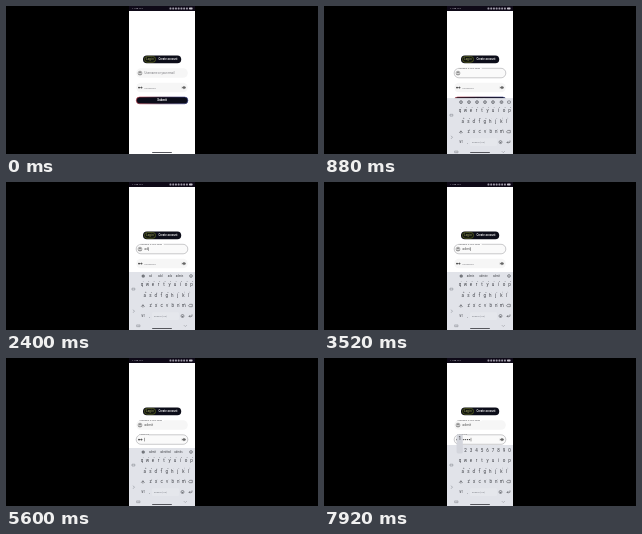
Animation, 312 px wide and 148 px high, one loop 8000 ms. Source, as an HTML page:

```html
<!DOCTYPE html>
<html lang="en">
<head>
<meta charset="utf-8">
<title>Sign-in form</title>
<style>
html, body { margin: 0; width: 100%; height: 100%; overflow: hidden; background: #000; }
svg { display: block; width: 100%; height: 100%; }
text { font-family: Roboto, Arial, sans-serif; }
</style>
</head>
<body>
<svg id="stage" viewBox="0 0 312 148">
  <defs>
    <clipPath id="screen"><rect x="122.9" width="66.2" height="148"/></clipPath>
    <linearGradient id="rim">
      <stop stop-color="#d13c4b"/><stop offset=".45" stop-color="#4b2848"/><stop offset="1" stop-color="#3c4694"/>
    </linearGradient>
  </defs>
</svg>
<script>
const LOOP = 8000;
const stage = document.getElementById('stage');

function add(parent, tag, attrs, content) {
  const node = document.createElementNS('http://www.w3.org/2000/svg', tag);
  for (const key in attrs) node.setAttribute(key, attrs[key]);
  if (content !== undefined) node.textContent = content;
  parent.append(node);
  return node;
}
const group = (parent, attrs = {}) => add(parent, 'g', attrs);
const box = (parent, x, y, width, height, rx, fill, more = {}) =>
  add(parent, 'rect', { x, y, width, height, rx, fill, ...more });
const label = (parent, x, y, size, content, fill, more = {}) =>
  add(parent, 'text', { x, y, 'font-size': size, fill, ...more }, content);
const line = (parent, d, stroke, width = 0.5) =>
  add(parent, 'path', { d, stroke, 'stroke-width': width, fill: 'none', 'stroke-linecap': 'round' });
const dot = (parent, cx, cy, r, fill, more = {}) => add(parent, 'circle', { cx, cy, r, fill, ...more });
const show = (node, on) => node.setAttribute('visibility', on ? 'inherit' : 'hidden');
const middle = { 'text-anchor': 'middle' };

const phone = group(stage, { 'clip-path': 'url(#screen)' });
box(phone, 122, 0, 68, 148, 0, '#fff');
box(phone, 122, 0, 68, 5, 0, '#0e0917');
label(phone, 126, 3.4, 2.5, '11:58 AM', '#c9c5d0');
for (const x of [163.5, 166.3, 169, 171.7, 174.5, 177.2, 180]) box(phone, x, 1.5, 1.9, 1.9, 0.4, '#9c97a5');
box(phone, 183, 1.4, 3.6, 2, 0.7, '#c4c0ca');

// Mode switch
box(phone, 137, 49.5, 38.2, 7.7, 3.8, '#0c0d19');
box(phone, 138.4, 50.4, 11.2, 5.9, 2.9, '#12150f', { stroke: '#87932c', 'stroke-width': 0.45 });
label(phone, 144, 54.3, 2.7, 'Log in', '#b9bd72', middle);
label(phone, 162, 54.3, 2.8, 'Create account', '#fff', { ...middle, 'font-weight': 500 });

// Submit button
box(phone, 130.3, 91, 51.6, 6.8, 3.4, '#0b0c19', { stroke: 'url(#rim)', 'stroke-width': 0.6 });
label(phone, 156, 95.4, 2.9, 'Submit', '#fff', { ...middle, 'font-weight': 700 });

function makeField(y, caption, size) {
  const mid = y + 4.8;
  const root = group(phone);
  const frame = box(root, 130.2, y, 51.6, 9.5, 4.7, '#f6f6f6', { 'stroke-width': 0.4 });
  const gap = box(root, 132.7, y - 0.6, caption.length * 1.07 + 1.5, 1.4, 0, '#fff');
  const text = label(root, 138.5, mid + 1, size, caption, '#77777c');
  const value = label(root, 138.3, mid + 1.1, 3.5, '', '#555');
  const caret = box(root, 138.4, mid - 1.8, 0.4, 3.6, 0, '#222');
  return { root, frame, gap, text, value, caret, y, mid, size };
}
const user = makeField(62.3, 'Username or your email', 2.85);
const pass = makeField(76.8, 'Password', 2.5);

dot(user.root, 134, 67.1, 1.9, 'none', { stroke: '#444', 'stroke-width': 0.45 });
dot(user.root, 134, 66.5, 0.65, '#444');
line(user.root, 'M132.9 68.3q1.1-1 2.2 0', '#444', 0.45);
dot(pass.root, 133, 81.6, 0.85, '#333');
line(pass.root, 'M133.8 81.6h2.4M135.5 81v1.2', '#333', 0.6);
line(pass.root, 'M176 81.6q2-2.8 4 0q-2 2.8-4 0', '#333', 0.5);
dot(pass.root, 178, 81.6, 0.8, '#333');
const bullets = Array.from({ length: 4 }, (_, i) => dot(pass.root, 139.2 + i * 2.1, 81.6, 0.72, '#333'));

// Keyboard
const keyboard = group(phone);
const panel = box(keyboard, 122, 90, 68, 60, 0, '#e1e3e9');
const ink = '#3d3f45', soft = '#777a82';
const tools = group(keyboard), words = group(keyboard), digits = group(keyboard), hints = group(keyboard);
const rows = [
  ['qwertyuiop', 136, 102], ['asdfghjkl', 138.8, 113], ['zxcvbnm', 144.7, 123.6]
];
const keys = {};
function addRow(parent, letters, x0, y) {
  [...letters].forEach((char, i) => {
    const x = x0 + i * 5.5;
    keys[char] = [x, y];
    label(parent, x, y + 1.5, 4.5, char, ink, middle);
  });
}
for (const row of rows) addRow(keyboard, ...row);
addRow(digits, '1234567890', 136, 92);

['1234567890', '@#$%&-+()', '*"\':;!?'].forEach((signs, r) => {
  const parent = r ? keyboard : hints;
  [...signs].forEach((sign, i) =>
    label(parent, rows[r][1] + 1 + i * 5.5, rows[r][2] - 2.1, 2.1, sign, '#63666e', middle));
});

for (const x of [137, 145, 153, 161, 169, 177.5]) {
  dot(tools, x, 94, 1.4, 'none', { stroke: ink, 'stroke-width': 0.6 });
  dot(tools, x, 94, 0.5, ink);
}
box(tools, 183.6, 92.8, 2.8, 2.4, 0.5, 'none', { stroke: ink, 'stroke-width': 0.5 });
dot(words, 137.2, 94, 1.6, '#55585f');
line(words, 'M136.6 94h1.2', '#fff', 0.4);
dot(words, 185, 94, 1.4, 'none', { stroke: ink, 'stroke-width': 0.5 });
line(words, 'M184.3 93.8l.7.7l.7-.7', ink, 0.4);
const slots = [0, 1, 2, 3].map(() => label(words, 0, 95, 2.7, '', ink, middle));

line(keyboard, 'M126.4 106.2h2.4v1.8h-2.4zM127.4 130.4l1-1.2-1-1.2', soft, 0.5);
line(keyboard, 'M135.4 124.5l1.5-1.7 1.5 1.7M136.9 123v2.2', ink, 0.5);
line(keyboard, 'M182.7 123.5l1-1.2h2.6v2.4h-2.6z', ink, 0.5);
label(keyboard, 137, 135.1, 2.7, '!#1', ink, middle);
label(keyboard, 143.5, 135, 3.4, ',', ink, middle);
box(keyboard, 146, 130.2, 27, 7.7, 1.2, '#e5e7ec');
label(keyboard, 154.5, 135, 2.4, 'English (US)', soft, middle);
dot(keyboard, 176.5, 134, 1.5, 'none', { stroke: ink, 'stroke-width': 0.5 });
dot(keyboard, 176.5, 134.2, 0.5, ink);
line(keyboard, 'M186 132.8v1.5h-3l.8-.8m-.8.8l.8.8', ink, 0.5);
line(keyboard, 'M131 142.9h3v1.8h-3zM131.8 144h1.4M178 143.3l1.3 1.3 1.3-1.3', soft, 0.4);

const popup = group(phone);
const bubble = box(popup, 0, 0, 6.2, 19, 1.4, '#d3d5dc');
const popupChar = label(popup, 0, 0, 4.7, '', '#222', middle);
box(phone, 146, 146.1, 20, 0.9, 0.45, '#55565c');

const FOCUS_USER = 80, FOCUS_PASS = 5200, NUMBERS = 5840;
// time, key, field
const presses = [
  [1280, 'a', user], [2000, 'd', user], [2640, 'm', user], [3120, 'i', user], [4160, 't', user],
  [6240, 'a', pass], [6480, 'd', pass], [7040, 'm', pass], [7840, '1', pass]
];
// time, then suggested words
const suggestions = [
  [1280, 'a', 'and', 'are', 'also'], [2000, 'ad', 'add', 'ads', 'admin'],
  [2640, 'admin', 'admire', 'admit'], [4160, 'admit', 'admitted', 'admits']
];
const clamp = v => Math.min(1, Math.max(0, v));
const easeOut = v => 1 - (1 - clamp(v)) ** 3;
const mix = (a, b, p) => a + (b - a) * p;

function drawField(field, t, start, focused, typed, blinkStart) {
  const lift = easeOut((t - start) / 240);
  field.text.setAttribute('x', mix(138.5, 133.4, lift));
  field.text.setAttribute('y', mix(field.mid + 1, field.y + 0.6, lift));
  field.text.setAttribute('font-size', mix(field.size, 2.15, lift));
  field.text.setAttribute('fill', lift > 0.5 ? '#4a4a4f' : '#77777c');
  field.frame.setAttribute('stroke', focused ? '#7c7c82' : 'none');
  field.frame.setAttribute('fill', focused ? '#fafafa' : '#f6f6f6');
  show(field.gap, lift > 0.5);
  const secret = field === pass;
  field.value.textContent = secret ? '' : typed;
  const end = secret ? 138.4 + typed.length * 2.1 : 138.4 + (typed ? field.value.getComputedTextLength() + 0.2 : 0);
  field.caret.setAttribute('x', end);
  show(field.caret, focused && t > start + 160 && (t - blinkStart) % 1000 < 500);
}

function render(t) {
  const done = presses.filter(([at]) => t >= at);
  const last = done[done.length - 1];
  const typedIn = field => done.filter(p => p[2] === field).map(p => p[1]).join('');
  const secret = typedIn(pass);
  const blinkStart = Math.max(t >= FOCUS_PASS ? FOCUS_PASS : FOCUS_USER, last ? last[0] : 0);
  drawField(user, t, FOCUS_USER, t >= FOCUS_USER && t < FOCUS_PASS, typedIn(user), blinkStart);
  drawField(pass, t, FOCUS_PASS, t >= FOCUS_PASS, secret, blinkStart);
  bullets.forEach((bullet, i) => show(bullet, i < secret.length));

  const numbers = t >= NUMBERS;
  keyboard.setAttribute('transform', `translate(0 ${mix(58, 0, easeOut((t - 560) / 480))})`);
  panel.setAttribute('y', numbers ? 87 : 90);
  panel.setAttribute('height', numbers ? 63 : 60);
  show(digits, numbers);
  show(hints, !numbers);
  const suggested = suggestions.filter(([at]) => t >= at).pop();
  show(tools, !numbers && !suggested);
  show(words, !numbers && suggested);
  if (suggested) {
    const list = suggested.slice(1);
    slots.forEach((slot, i) => {
      slot.textContent = list[i] || '';
      slot.setAttribute('x', list.length > 3 ? 144.5 + i * 9.7 : 146.5 + i * 13);
    });
  }

  const pressed = last && t < last[0] + 160;
  show(popup, pressed);
  if (pressed) {
    const [x, y] = keys[last[1]];
    bubble.setAttribute('x', x - 3.4);
    bubble.setAttribute('y', y - 15.6);
    popupChar.textContent = last[1];
    popupChar.setAttribute('x', x - 0.3);
    popupChar.setAttribute('y', y - 10);
  }
}

const begin = performance.now();
function tick() {
  render((performance.now() - begin) % LOOP);
  requestAnimationFrame(tick);
}
tick();
</script>
</body>
</html>
```
